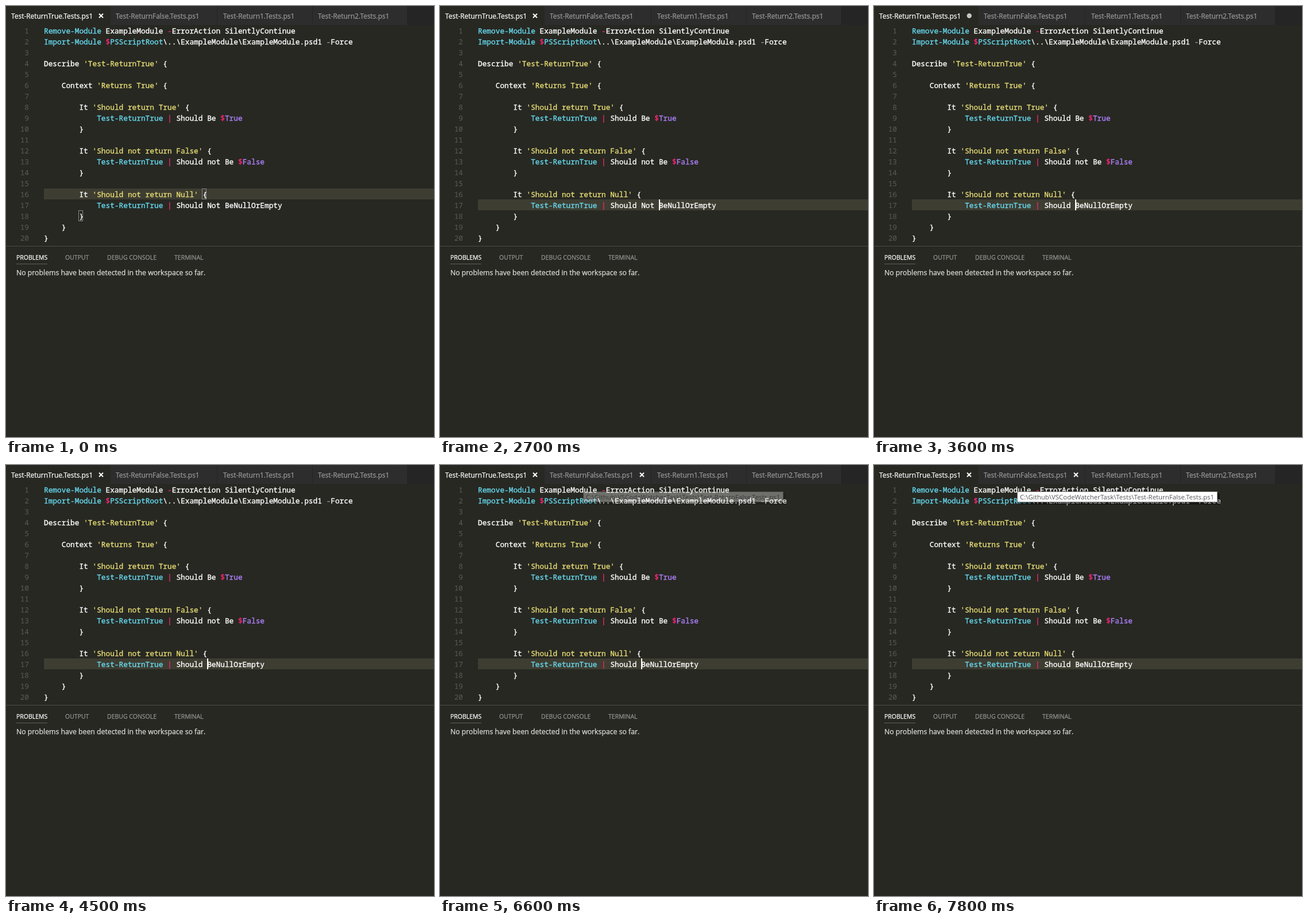
An HTML page that plays this animation: 745x751 px, repeating every 8000 ms.

```html
<!DOCTYPE html>
<html lang="en">
<head>
<meta charset="utf-8">
<title>Editor</title>
<style>
  html, body { margin: 0; width: 100%; height: 100%; overflow: hidden; background: #272822; }
  svg { display: block; }
  text { white-space: pre; fill: currentColor; }
  tspan { fill: currentColor; stroke: currentColor; stroke-width: 0.35px; }
  .code { font: 500 12.8px "Noto Sans Mono", monospace; color: #fff; font-variant-ligatures: none; }
  .num { font-weight: 400; color: #5a5b54; text-anchor: end; }
  .ui { font-family: "Open Sans", "Noto Sans", sans-serif; }
  .bright { stroke: currentColor; stroke-width: 0.25px; }
  .cmd { color: #66d9ef; }
  .str { color: #e6db74; }
  .op { color: #f92672; }
  .dim { color: #a59a9a; }
  .const { color: #ae81ff; }
  .bracket { fill: none; stroke: #888; }
  .mark { fill: #3f4244; }
</style>
</head>
<body>
<svg id="stage" width="745" height="751" viewBox="0 0 745 751"></svg>
<script>
const LOOP = 8000, LEFT = 66, TOP = 33, CHAR = 7.68, LINE = 19, BASELINE = 15;
const EDIT_LINE = 17;

const source = String.raw`Remove-Module ExampleModule -ErrorAction SilentlyContinue
Import-Module $PSScriptRoot\..\ExampleModule\ExampleModule.psd1 -Force

Describe 'Test-ReturnTrue' {

    Context 'Returns True' {

        It 'Should return True' {
            Test-ReturnTrue | Should Be $True
        }

        It 'Should not return False' {
            Test-ReturnTrue | Should not Be $False
        }

        It 'Should not return Null' {
            Test-ReturnTrue | Should Not BeNullOrEmpty
        }
    }
}`.split("\n");

const stage = document.getElementById("stage");

function add(tag, attrs, parent = stage, content = "") {
  const node = document.createElementNS("http://www.w3.org/2000/svg", tag);
  for (const key in attrs) node.setAttribute(key, attrs[key]);
  if (content) node.textContent = content;
  parent.appendChild(node);
  return node;
}

const rect = (x, y, width, height, attrs, parent) =>
  add("rect", { x, y, width, height, ...attrs }, parent);
const label = (x, y, size, color, content, { bright = false, parent } = {}) =>
  add("text", { x, y, color, "font-size": size, class: bright ? "ui bright" : "ui" }, parent, content);
const colX = col => Math.round(LEFT + col * CHAR);
const lineY = line => TOP + (line - 1) * LINE;
const show = (node, on) => node.setAttribute("visibility", on ? "visible" : "hidden");

const rules = [
  [/^'[^']*'/, "str"],
  [/^(Remove-Module|Import-Module|Test-ReturnTrue|PSScriptRoot)/, "cmd"],
  [/^(\$|\||-(?=ErrorAction))/, "op"],
  [/^-(?=Force)/, "dim"],
  [/^(True|False)/, "const"],
  [/^(\w+|\s+|.)/, ""]
];

function drawCode(line, content) {
  const text = add("text", { x: LEFT, y: lineY(line) + BASELINE, class: "code" });
  while (content) {
    const [pattern, name] = rules.find(([p]) => p.test(content));
    const token = content.match(pattern)[0];
    add("tspan", { class: name }, text, token);
    content = content.slice(token.length);
  }
  return text;
}

function closeIcon(x) {
  return add("path", {
    d: `M${x - 3.5} 13.5l7 7m0-7l-7 7`, stroke: "#fff", "stroke-width": 2, fill: "none"
  });
}

// Tab bar
rect(0, 0, 745, 751, { fill: "#272822" });
rect(182, 0, 563, TOP, { fill: "#252526" });
[
  [0, 182, 9, "Test-ReturnTrue.Tests.ps1"],
  [182, 367, 191, "Test-ReturnFalse.Tests.ps1"],
  [368, 533, 378, "Test-Return1.Tests.ps1"],
  [534, 698, 543, "Test-Return2.Tests.ps1"]
].forEach(([start, end, x, name], i) => {
  if (i) rect(start, 0, end - start, TOP, { fill: "#2d2d2d" });
  label(x, 22, 11.95, i ? "#999" : "#fff", name, { bright: true });
});
const activeClose = closeIcon(165.5);
const hoverClose = closeIcon(351.5);
const dirtyDot = add("circle", { cx: 165.8, cy: 17, r: 4.2, fill: "#c5c5c5" });

// Editor
const currentLine = rect(LEFT, 0, 745 - LEFT, LINE, { fill: "#3e3d32" });
const selection = add("g", {});
[[12, 19], [13, 37], [16, 19]].forEach(([line, col]) =>
  rect(colX(col), lineY(line), 4 * CHAR, LINE, { class: "mark" }, selection));
rect(colX(37), lineY(EDIT_LINE), 4 * CHAR, LINE, { fill: "#575a5a" }, selection);

const brackets = add("g", {});
[[16, 36], [18, 8]].forEach(([line, col]) =>
  rect(colX(col) - 0.5, lineY(line) + 0.5, 7, LINE - 1, { class: "bracket" }, brackets));

let before;
source.forEach((content, i) => {
  const line = i + 1;
  add("text", { x: 40, y: lineY(line) + BASELINE, class: "code num" }, stage, String(line));
  const text = drawCode(line, content);
  if (line === EDIT_LINE) before = text;
});
const after = drawCode(EDIT_LINE, source[EDIT_LINE - 1].replace("Not ", ""));
const caret = rect(0, lineY(EDIT_LINE), 2, LINE, { fill: "#fff" });

// Panel
rect(0, 418, 745, 1, { fill: "#4a4b46" });
[[18, "PROBLEMS"], [103, "OUTPUT"], [176, "DEBUG CONSOLE"], [293, "TERMINAL"]]
  .forEach(([x, name], i) => label(x, 442, 10.5, i ? "#939390" : "#fff", name, { bright: true }));
rect(18, 449, 54, 1, { fill: "#5f605b" });
label(18, 469, 12.28, "#dededa", "No problems have been detected in the workspace so far.", { bright: true });

// Tooltip
const tooltip = add("g", {});
rect(253, 50, 349, 19, { fill: "#000", opacity: 0.4 }, tooltip);
rect(249.5, 46.5, 348, 18, { fill: "#fff", stroke: "#767676" }, tooltip);
label(254, 60, 11.44, "#575757",
  String.raw`C:\Github\VSCodeWatcherTask\Tests\Test-ReturnFalse.Tests.ps1`, { parent: tooltip });

// [time, caret column], null while hidden
const caretSteps = [
  [0, null], [800, 54], [1300, null], [1700, 41], [1900, 37], [2200, 40], [2700, 41],
  [3000, 37], [4100, null], [4500, 37], [5000, null], [5500, 37], [5900, null],
  [6400, 37], [6800, null], [7300, 37], [7800, null]
];

function render(t) {
  const within = (from, to) => t >= from && t < to;
  const col = caretSteps.findLast(([time]) => time <= t)[1];

  show(caret, col !== null);
  if (col !== null) caret.setAttribute("x", colX(col));

  currentLine.setAttribute("y", lineY(t < 800 ? 16 : EDIT_LINE));
  show(currentLine, !within(3000, 3500));
  show(selection, within(3000, 3500));
  show(brackets, t < 900);
  show(before, t < 3500);
  show(after, t >= 3500);

  const dirty = within(3600, 4300);
  show(dirtyDot, dirty);
  show(activeClose, !dirty);
  show(hoverClose, t >= 5700);

  const fade = Math.floor((t - 6500) / 100) / 3;
  tooltip.setAttribute("opacity", Math.max(0, Math.min(1, fade)));
}

const start = performance.now();
function tick() {
  render((performance.now() - start) % LOOP);
  requestAnimationFrame(tick);
}
tick();
</script>
</body>
</html>
```
